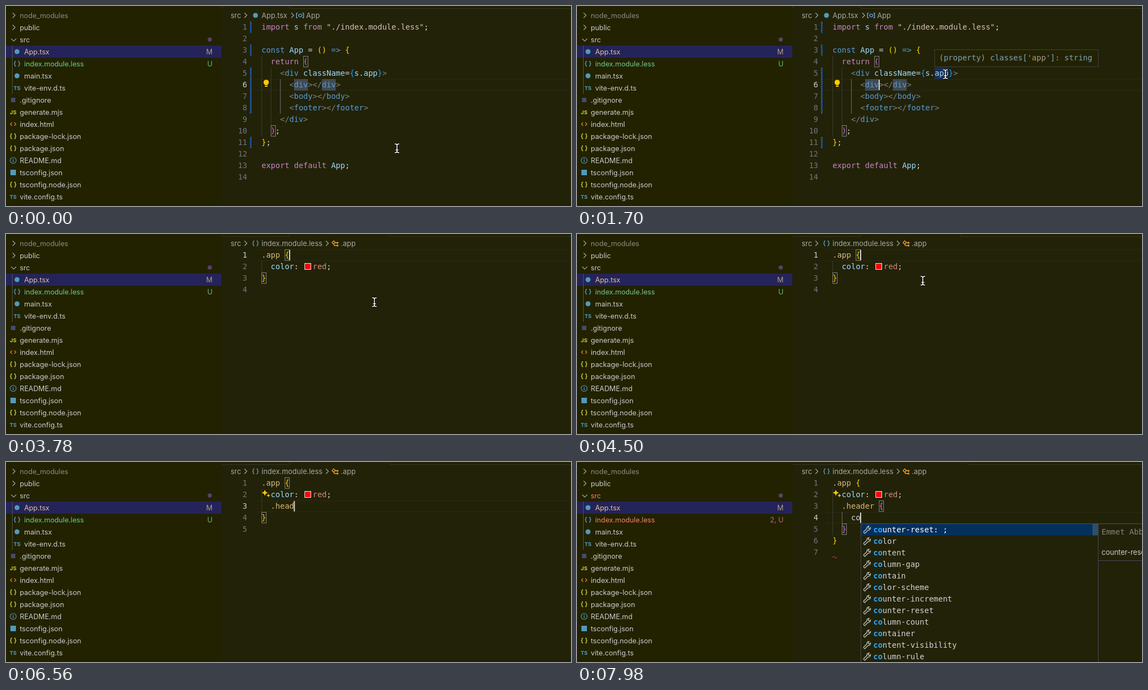
An HTML page for the animation above (8 s loop, 1026x364 px).

```html
<!DOCTYPE html>
<html lang="en">
<head>
<meta charset="utf-8">
<title>Editor demo</title>
<style>
html, body { margin: 0; width: 100%; height: 100%; overflow: hidden; background: #222200; }
svg { display: block; }
text { white-space: pre; }
.ui { font: 12.75px Inter, sans-serif; }
.crumb { font: 13px Inter, sans-serif; }
.mono { font: 14px "DejaVu Sans Mono", monospace; }
.icon { font: bold 9.5px Inter, sans-serif; text-anchor: middle; }
.end { text-anchor: end; }
.bold { font-weight: bold; }
.line { fill: none; }
</style>
</head>
<body>
<svg id="stage" width="1026" height="364" viewBox="0 0 1026 364"></svg>
<script>
const BG = '#222200', PANE = '#222208', KEY = '#c586c0', VAR = '#9cdcfe', TAG = '#569cd6', STR = '#d8c0b8',
  PUNCT = '#808080', TEXT = '#d4d4d4', GOLD = '#ffd700', PINK = '#da70d6', BLUE = '#179fff',
  SEL = '#d7ba7d', RED = '#f88070', ICON = '#519aba', YELLOW = '#cbcb41', EDGE = '#48485a';
const CHAR = 8.428, LEFT = 464;
const colX = c => LEFT + c * CHAR;
const rowTop = r => 28 + 21 * r;
const esc = s => s.replace(/&/g, '&amp;').replace(/</g, '&lt;');

// Drawing helpers
const text = (x, y, s, fill, cls) => `<text x="${x}" y="${y}" fill="${fill}" class="${cls}">${esc(s)}</text>`;
const rect = (x, y, w, h, fill, stroke = 'none') =>
  `<rect x="${x}" y="${y}" width="${w}" height="${h}" fill="${fill}" stroke="${stroke}"/>`;
const path = (d, stroke, width = 1) => `<path d="${d}" class="line" stroke="${stroke}" stroke-width="${width}"/>`;
const circle = (x, y, r, fill) => `<circle cx="${x}" cy="${y}" r="${r}" fill="${fill}"/>`;
const chevron = (x, y) => path(`M${x - 2} ${y - 4.5}l4.5 4.5-4.5 4.5`, '#a8a8a0', 1.2);

// Coloured text from alternating colour and string arguments
function tokens(x, y, ...parts) {
  let spans = '';
  for (let i = 0; i < parts.length; i += 2)
    spans += `<tspan fill="${parts[i]}">${esc(parts[i + 1])}</tspan>`;
  return `<text x="${x}" y="${y}" class="mono">${spans}</text>`;
}
const code = (col, row, ...parts) => tokens(colX(col), rowTop(row) + 15, ...parts);
const brace = (col, row) => rect(colX(col) + .5, rowTop(row) + .5, 8, 19.5, 'none', '#85858a');
const guide = (col, from, to, stroke = '#3c3c34') =>
  path(`M${colX(col) + .5} ${rowTop(from)}V${rowTop(to + 1)}`, stroke);
const caret = (x, row) => rect(x - .5, rowTop(row) + 1, 2, 19, '#d8d8d8');
const squiggle = (x, y) => path(`M${x} ${y}q2-3 4 0t4 0`, '#d0404c', 1.2);

function gutter(count, active) {
  let out = path(`M451 ${rowTop(active) + .5}H1026M451 ${rowTop(active + 1) - .5}H1026`, '#2a2a18');
  for (let r = 0; r < count; r++)
    out += text(438, rowTop(r) + 15, `${r + 1}`, r === active ? '#cccccc' : '#6e7681', 'mono end');
  return out;
}

// Bottom edge of the tab bar, open below the active tab
const tabs = (from, to) => rect(392, 0, 634, 364, PANE) +
  rect(392, 0, from - 392, 4, BG) + rect(to, 0, 1026 - to, 4, BG) +
  path(`M392 4.5H${from}V0M1026 4.5H${to}V0`, '#34342a');

const curly = (x, y, fill) => {
  const side = s => `M${x + 2 * s} ${y - 4.5}q${2 * s} 0 ${2 * s} 2v1q0 1.5 ${1.5 * s} 1.5` +
    `q${-1.5 * s} 0 ${-1.5 * s} 1.5v1q0 2 ${-2 * s} 2`;
  return path(side(-1) + side(1), fill, 1.4);
};
const icons = {
  dot: (x, y) => circle(x, y, 4.5, ICON),
  less: (x, y) => curly(x, y, ICON),
  json: (x, y) => curly(x, y, YELLOW),
  ts: (x, y) => text(x, y + 3.5, 'TS', ICON, 'icon'),
  js: (x, y) => text(x, y + 3.5, 'JS', YELLOW, 'icon'),
  html: (x, y) => path(`M${x - 2} ${y - 3}l-3 3 3 3M${x + 2} ${y - 3}l3 3-3 3`, '#e37933', 1.4),
  git: (x, y) => rect(x - 4, y - 4, 8, 8, '#454a70'),
  square: (x, y) => rect(x - 5, y - 5, 10, 10, ICON),
  info: (x, y) => `<circle cx="${x}" cy="${y}" r="5.5" class="line" stroke="${ICON}" stroke-width="1.2"/>` +
    path(`M${x} ${y - 3}v1.5M${x} ${y - .5}v3.5`, ICON, 1.5)
};
const files = [
  ['App.tsx', 'dot', 1], ['index.module.less', 'less', 1], ['main.tsx', 'dot', 1], ['vite-env.d.ts', 'ts', 1],
  ['.gitignore', 'git'], ['generate.mjs', 'js'], ['index.html', 'html'], ['package-lock.json', 'json'],
  ['package.json', 'json'], ['README.md', 'info'], ['tsconfig.json', 'square'],
  ['tsconfig.node.json', 'json'], ['vite.config.ts', 'ts']
];

function sidebar(errors) {
  const lessFill = errors ? RED : '#73c991';
  let out = rect(0, 72, 391, 22, '#24245a') +
    path('M11.5 72V160', '#55554a') +
    chevron(14, 17) + chevron(14, 39) + path('M9.5 59.5l4.5 4.5 4.5-4.5', '#a8a8a0', 1.2) +
    text(25, 21.5, 'node_modules', '#8c8c84', 'ui') + text(25, 43.5, 'public', '#cccccc', 'ui') +
    text(25, 65.5, 'src', errors ? RED : '#cccccc', 'ui') + circle(370, 61, 3.8, '#5c4068');
  files.forEach(([name, icon, nested], i) => {
    const y = 83 + 22 * i;
    const fill = i === 0 ? '#e2c08d' : i === 1 ? lessFill : '#cccccc';
    out += icons[icon](nested ? 20 : 13, y) + text(nested ? 33 : 25, y + 4.5, name, fill, 'ui');
  });
  return out + text(375, 87.5, 'M', '#b89c78', 'ui end') +
    text(375, 109.5, errors ? `${errors}, U` : 'U', errors ? '#c0687a' : '#62b884', 'ui end');
}

const crumb = (x, s) => text(x, 21.5, s, '#a9a9a4', 'crumb');

function tsxEditor(n) {
  const tag = (col, row, name) =>
    code(col, row, PUNCT, '<', TAG, name, PUNCT, '></', TAG, name, PUNCT, '>');
  let out = tabs(392, 515) + crumb(408, 'src') + chevron(435, 17) + icons.dot(453, 17) + crumb(464, 'App.tsx') +
    chevron(520, 17) + crumb(545, 'App') +
    path('M530 13h-2.5v8.5h2.5M538 13h2.5v8.5h-2.5', '#75beff', 1.2) +
    path('M531.5 16l3-1.5 3 1.5v2.5l-3 1.5-3-1.5z', '#75beff', 1.1) +
    gutter(14, 5) + guide(0, 3, 9) + guide(2, 4, 8) + guide(4, 5, 7, '#707078');
  for (const [from, to] of [[0, 0], [2, 2], [4, 7], [10, 10]])
    out += rect(443, rowTop(from), 3, 21 * (to - from + 1), 'url(#hatch)');
  if (n >= 18) out += rect(colX(22), rowTop(4), 3 * CHAR, 21, '#1d2f58');
  out += [7, 13].map(c => rect(colX(c), rowTop(5), 3 * CHAR, 21, '#414a52')).join('') +
    brace(9, 3) + brace(2, 9) +
    code(0, 0, KEY, 'import ', VAR, 's ', KEY, 'from ', STR, '"./index.module.less"', TEXT, ';') +
    code(0, 2, TAG, 'const ', VAR, 'App ', TEXT, '= ', GOLD, '() ', TAG, '=> ', GOLD, '{') +
    code(2, 3, KEY, 'return ', PINK, '(') +
    code(4, 4, PUNCT, '<', TAG, 'div ', VAR, 'className', TEXT, '=', BLUE, '{', VAR, 's', TEXT, '.',
      VAR, 'app', BLUE, '}', PUNCT, '>') +
    tag(6, 5, 'div') + tag(6, 6, 'body') + tag(6, 7, 'footer') +
    code(4, 8, PUNCT, '</', TAG, 'div', PUNCT, '>') +
    code(2, 9, PINK, ')', TEXT, ';') + code(0, 10, GOLD, '}', TEXT, ';') +
    code(0, 12, KEY, 'export default ', VAR, 'App', TEXT, ';') +
    circle(472.5, 139, 4.8, '#ffcc00') + rect(470, 142, 5, 5, '#ffcc00') + path('M470 144.5h5', BG);
  if (blink(n)) out += caret(colX(10), 5);
  const fade = Math.min(1, Math.max(0, (n - 20) / 4));
  return out + `<g opacity="${fade}">` + rect(649.5, 79.5, 297, 31, BG, EDGE) +
    tokens(657.5, 99, '#a0ccf4', "(property) classes['", STR, 'app', '#a0ccf4', "']: string") + '</g>';
}

const WORD = '.header {', WORD_KEYS = [104, 111, 115, 119, 123, 129, 132, 136, 139];
const OPEN = 60, CLICK = 92, ENTER = 98, BLOCK = 145, CO_KEYS = [150, 154];
const events = [0, OPEN, CLICK, ENTER, ...WORD_KEYS, BLOCK, ...CO_KEYS];
const typed = (word, keys, n) => word.slice(0, keys.filter(k => n >= k).length);
const blink = n => (n - Math.max(...events.filter(e => e <= n), -22)) % 22 < 11 && n >= 0;

function lessEditor(n, errors) {
  const word = typed(WORD, WORD_KEYS, n), prop = typed('co', CO_KEYS, n);
  const open = n >= ENTER, block = n >= BLOCK, nested = word === WORD;
  const last = block ? 5 : open ? 3 : 2;
  const [x, row] = n < CLICK ? [colX(6), 0] : !open ? [591, 1] :
    !block ? [colX(2 + word.length), 2] : [colX(4 + prop.length), 3];
  let out = tabs(515, errors ? 710 : 697) +
    crumb(408, 'src') + chevron(435, 17) + icons.less(453, 17) + crumb(464, 'index.module.less') +
    chevron(583, 17) + crumb(608, '.app') +
    path('M592 16l3-3.5 3 2.5-3 3.5zM597 16h4M596 18v3h5', '#ee9d28', 1.3) +
    circle(602, 16, 1.7, '#ee9d28') + circle(602, 21, 1.7, '#ee9d28') +
    gutter(last + 2, row) + guide(0, 1, last - 1);
  if (block) out += guide(2, 3, 3, '#707078');
  out += nested ? brace(10, 2) + (block ? brace(2, 4) : brace(11, 2)) : brace(5, 0) + brace(0, last);
  out += code(0, 0, SEL, '.app ', GOLD, '{') + code(2, 1, VAR, 'color', TEXT, ':') +
    rect(542.5, 53.5, 11, 11, '#ff0000', '#eeeeee') +
    tokens(557, rowTop(1) + 15, '#ce9178', 'red', TEXT, ';') +
    code(2, 2, SEL, word.slice(0, 8), PINK, word.slice(8) + (nested && !block ? '}' : '')) +
    code(0, last, GOLD, '}');
  if (block) out += code(4, 3, TEXT, prop) + code(2, 4, PINK, '}');
  if (n >= 120)
    out += '<path fill="#ffcc00" d="M470 50.5l1.7 3.8 3.8 1.7-3.8 1.7-1.7 3.8-1.7-3.8-3.8-1.7 3.8-1.7z' +
      'M476.5 57.5l1 2.5 2.5 1-2.5 1-1 2.5-1-2.5-2.5-1 2.5-1z"/>';
  if (errors === 1) out += squiggle(481, 90);
  if (errors === 2) out += squiggle(464, 173.5);
  if (blink(n)) out += caret(x, row);
  if (n >= 106 && n < 111) out += rect(489.5, 91.5, 431, 24, '#04305c', EDGE) +
    path('M494 98h6m2 0h5M494 101.5h3m2 0h8M494 105h7m2 0h3M494 108.5h4m2 0h7', '#c0c8cc', 1.4) +
    tokens(513, 108, '#5fa0d0', '.', '#ffffff', 'app');
  return n >= 155 ? out + suggestions() : out;
}

const items = ['counter-reset: ;', 'color', 'content', 'column-gap', 'contain', 'color-scheme',
  'counter-increment', 'counter-reset', 'column-count', 'container', 'content-visibility', 'column-rule'];
const wrench = (x, y) => path(`M${x - 5.5} ${y + 4}l6-6q-1-4 4-4.5l-2 3 2 2 2.5-2q0 5-4.5 4.5l-6 6q-2-.5-2-3z`,
  '#c8c8c4', 1.2);

function suggestions() {
  let out = rect(515.5, 112.5, 431, 260, PANE, EDGE) + rect(516, 113, 430, 20.5, '#04305c') +
    rect(936, 113, 10, 20.5, '#2c5068') + rect(946.5, 112.5, 90, 67, PANE, EDGE) +
    tokens(952.5, 132, '#85857e', 'Emmet Abbreviation') + text(952.5, 169, 'counter-reset: ;', '#cccccc', 'crumb');
  items.forEach((item, i) => {
    const y = 123 + 21 * i;
    out += wrench(526, y) +
      `<text x="538" y="${y + 5}" class="mono" fill="${i ? TEXT : '#ffffff'}">` +
      `<tspan class="bold" fill="#2aaaff">co</tspan>${item.slice(2)}</text>`;
  });
  return out;
}

const route = [[-1, 710, 259], [3, 710, 259], [11, 678, 180], [14, 673, 139], [17, 669, 124],
  [74, 669, 124], [83, 628, 85], [90, 598, 64], [ENTER, 598, 64]];

function pointer(n) {
  const i = route.findIndex(p => p[0] > n);
  if (i < 0) return '';
  const [a, ax, ay] = route[i - 1], [b, bx, by] = route[i], k = (n - a) / (b - a);
  const x = ax + (bx - ax) * k, y = ay + (by - ay) * k;
  const d = `M${x - 4} ${y - 8}q4 0 4 2.5q0-2.5 4-2.5M${x} ${y - 6}V${y + 6}` +
    `M${x - 4} ${y + 8}q4 0 4-2.5q0 2.5 4 2.5M${x - 2.5} ${y + 3}h5`;
  return path(d, '#000000', 3.6) + path(d, '#ffffff', 1.6);
}

const defs = '<defs><pattern id="hatch" width="3" height="3" patternUnits="userSpaceOnUse" ' +
  'patternTransform="rotate(-45)"><rect width="3" height="2" fill="#1c62c8"/></pattern></defs>';

function scene(n) {
  const errors = n >= 152 ? 2 : n >= 106 && n < 115 ? 1 : 0;
  return defs + sidebar(errors) + (n < OPEN ? tsxEditor(n) : lessEditor(n, errors)) + pointer(n);
}

// Three steps every 140 ms, lasting 20, 20 and 100 ms, after an opening hold
function stepAt(ms) {
  const t = ms % 8000 - 680, rest = t % 140;
  return t < 0 ? -1 : 3 * Math.floor(t / 140) + (rest >= 20) + (rest >= 40);
}

const stage = document.getElementById('stage');
let shown;
function tick() {
  const n = stepAt(performance.now());
  if (n !== shown) stage.innerHTML = scene(shown = n);
  requestAnimationFrame(tick);
}
tick();
</script>
</body>
</html>
```
